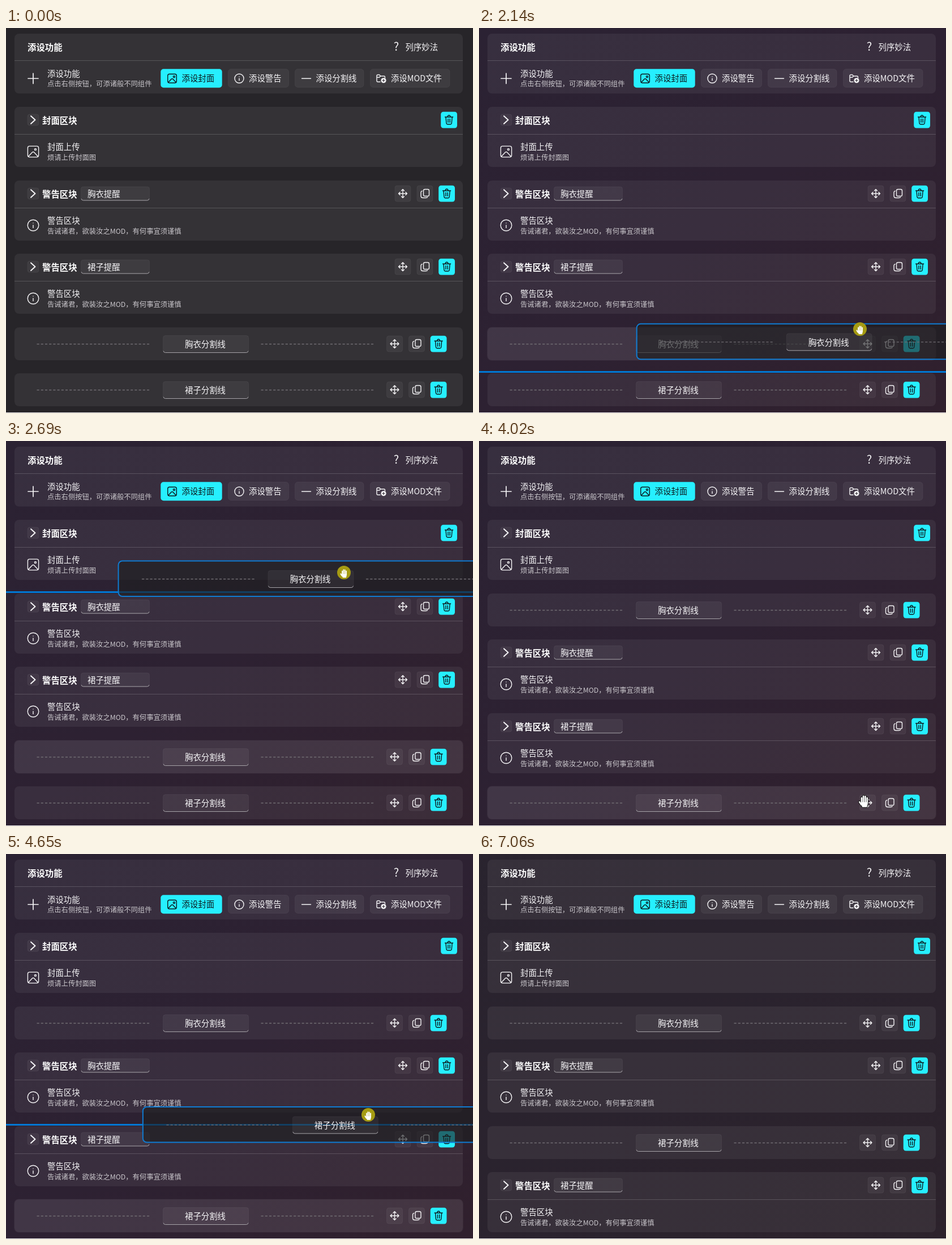
An HTML page for the animation above (7.09 s loop, 825x679 px).

```html
<!DOCTYPE html>
<html lang="zh-CN">
<head>
<meta charset="utf-8">
<style>
html, body { margin: 0; width: 100%; height: 100%; overflow: hidden; background: #272529; }
svg { display: block; width: 825px; height: 679px; }
text { font-family: "Noto Sans CJK SC", "Noto Sans CJK", sans-serif; font-weight: 350; fill: #f6f5f7; }
.b { font-weight: 700; fill: #fff; }
.d { fill: #c9c6cb; }
.k { fill: #0b1a1d; }
.i { fill: none; stroke: #f4f3f5; stroke-width: 1.4; stroke-linecap: round; stroke-linejoin: round; }
.i.dark { stroke: #0b1a1d; }
.card { fill: #fff; fill-opacity: .06; }
.hover { fill: #fff; fill-opacity: .04; }
.box { fill: #fff; fill-opacity: .05; stroke: #fff; stroke-opacity: .05; }
.cyan { fill: #26efff; }
.dash { stroke: #706c72; stroke-width: 1.3; stroke-dasharray: 4.2 3; }
</style>
</head>
<body>
<svg id="stage" viewBox="0 0 825 679" xmlns="http://www.w3.org/2000/svg"></svg>
<script>
const LOOP = 7090;
const stage = document.getElementById('stage');

// ---- drawing helpers ----
const text = (x, cy, s, size = 14.4, cls = '', anchor = 'start') =>
  `<text x="${x}" y="${cy + size * .37}" font-size="${size}" class="${cls}" text-anchor="${anchor}">${s}</text>`;
const rect = (x, y, w, h, r, cls) =>
  `<rect x="${x}" y="${y}" width="${w}" height="${h}" rx="${r}" class="${cls}"/>`;
const icon = (x, y, d, cls = '', extra = '') =>
  `<path transform="translate(${x} ${y})" class="i ${cls}" d="${d}" ${extra}/>`;
const ring = (r) => `M${-r} 0a${r} ${r} 0 1 0 ${2 * r} 0a${r} ${r} 0 1 0 ${-2 * r} 0`;

const ICON = {
  plus: 'M-9 0H9M0 -9V9',
  minus: 'M-8 0H8',
  chevron: 'M-3.5 -6.8L4 0L-3.5 6.8',
  move: 'M-7.5 0H7.5M0 -7.5V7.5M-5 -2.5L-7.5 0L-5 2.5M5 -2.5L7.5 0L5 2.5M-2.5 -5L0 -7.5L2.5 -5M-2.5 5L0 7.5L2.5 5',
  copy: 'M0 -7.5H5Q7.5 -7.5 7.5 -5V2Q7.5 4.5 5 4.5H0Q-2.5 4.5 -2.5 2V-5Q-2.5 -7.5 0 -7.5ZM-4.8 -4.6Q-7 -4 -7 -1.5V4Q-7 7.5 -3.5 7.5H1.5Q4 7.5 4.6 6.4',
  trash: 'M-7 -5H7M-2.4 -5Q-2.4 -8 0 -8Q2.4 -8 2.4 -5M-5.6 -5L-4.6 6Q-4.4 7.8 -2.6 7.8H2.6Q4.4 7.8 4.6 6L5.6 -5M-1.6 -1.8V4.4M1.6 -1.8V4.4',
  folder: 'M-1.5 6H-5.5Q-7.5 6 -7.5 4V-4.5Q-7.5 -6.5 -5.5 -6.5H-3L-.8 -4.2H5Q7 -4.2 7 -2.2V-1M-7.5 -2H-3L-.8 -4.2'
};
const info = (x, y, r) => icon(x, y, `${ring(r)}M0 ${-r * .02}V${r * .45}M0 ${-r * .42}v.1`);
const picture = (x, y, s, cls) => icon(x, y,
  `M${-s + 3} ${-s}H${s - 3}Q${s} ${-s} ${s} ${-s + 3}V${s - 3}Q${s} ${s} ${s - 3} ${s}H${-s + 3}Q${-s} ${s} ${-s} ${s - 3}V${-s + 3}Q${-s} ${-s} ${-s + 3} ${-s}Z` +
  `M${-s + 1.4} ${s - 1.4}L-1.4 1Q0 -.2 1.4 1L${s - 1.4} ${s - 1.4}M${s * .25} ${-s * .4}a1.5 1.5 0 1 0 3 0a1.5 1.5 0 1 0 -3 0`, cls);

const tool = (x, y, name) => rect(x - 14, y - 14, 28, 28, 4, 'box') + icon(x, y, ICON[name]);
const trash = (x, y) => rect(x - 14.4, y - 14.2, 28.8, 28.8, 4.5, 'cyan') + icon(x, y, ICON.trash, 'dark');
const tools = (x, y) => tool(x, y, 'move') + tool(x + 39, y, 'copy') + trash(x + 77.6, y);
const field = (x, y, w, h) => rect(x, y, w, h, 4, 'box') +
  `<path d="M${x + .5} ${y + h - 3}q.6 3 3.5 3h${w - 8}q2.9 0 3.5 -3" fill="none" stroke="#a5a2a7"/>`;
const panel = (h) => rect(15, 0, 792, h, 8, 'card') +
  `<rect class="hover" x="14" y="-.5" width="794" height="${h + 1}" rx="8" visibility="hidden"/>`;
const divider = (y) => `<path d="M15 ${y}H807" stroke="#fff" stroke-opacity=".17"/>`;
const caption = (y, title, note) => text(73, y + 70.5, title) + text(73, y + 88.5, note, 12.3, 'd');
const header = (title) => rect(38, 13, 20, 20, 4, 'box') +
  icon(47.5, 23, ICON.chevron, '', 'style="stroke-width:2"') + text(64, 24, title, 15.4, 'b');

// ---- cards, drawn with their top at y = 0 ----
const cover = () => panel(106) + header('封面区块') + trash(782.6, 23) + divider(48.5) +
  picture(48, 79, 9.6) + caption(.5, '封面上传', '烦请上传封面图');
const warning = (name) => panel(106) + header('警告区块') + field(132.5, 11, 121, 24) +
  text(144, 24, name) + tools(701, 23) + divider(48.5) + info(48, 79, 9.8) +
  caption(.5, '警告区块', '告诫诸君，欲装汝之MOD，有何事宜须谨慎');
const lineBody = (name) => `<path class="dash" d="M54.5 29.5H256M450.5 29.5H652"/>` +
  field(277.5, 14.5, 151, 30) + text(352, 30, name, 14.4, '', 'middle') + tools(686.5, 29);
const lineCard = (name) => panel(58) + lineBody(name);

const topCard = () => rect(15, 10, 792, 105.5, 8, 'card') + text(38, 34, '添设功能', 15.4, 'b') +
  text(689.5, 33, '?', 20, '', 'middle') + text(705.5, 33.5, '列序妙法') + divider(57.5) +
  icon(48, 89, ICON.plus, '', 'style="stroke-width:1.7"') +
  caption(10, '添设功能', '点击右侧按钮，可添诸般不同组件') +
  rect(273.3, 72.3, 108.4, 32.9, 5, 'cyan') + picture(293.5, 89, 7.8, 'dark') + text(310.5, 89, '添设封面', 14.4, 'k') +
  rect(392.5, 72.5, 107, 32, 5, 'box') + info(412, 89, 8) + text(429, 89, '添设警告') +
  rect(510.5, 72.5, 121.5, 32, 5, 'box') + icon(530.5, 89, ICON.minus) + text(547.5, 89, '添设分割线') +
  rect(643.5, 72.5, 140.5, 32, 5, 'box') + icon(662.5, 89, ICON.folder) +
  `<circle cx="667" cy="92.5" r="4.6" fill="#f4f3f5"/><path d="M664.6 92.5h4.8M667 90.1v4.8" stroke="#38333a" stroke-width="1.2"/>` +
  text(680, 89, '添设MOD文件');

const handFingers = 'M-4 1V-6.5M-.9 0V-9.5M2.4 0V-9.2M5.7 1V-6.5M-7.8 .5L-4.5 5.5M-4 2L-2 8.5H4.4L5.8 2Z';
const cards = {
  cover: { h: 106, pitch: 129.5, body: cover() },
  w1: { h: 106, pitch: 129.5, body: warning('胸衣提醒') },
  w2: { h: 106, pitch: 129.5, body: warning('裙子提醒') },
  s1: { h: 58, pitch: 81.6, body: lineCard('胸衣分割线') },
  s2: { h: 58, pitch: 81.6, body: lineCard('裙子分割线') }
};

stage.innerHTML = `
<defs>
  <linearGradient id="tint" x1="0" y1="0" x2="1" y2="1">
    <stop offset="0" stop-color="#2b2233"/><stop offset=".5" stop-color="#2d2132"/><stop offset="1" stop-color="#30202d"/>
  </linearGradient>
</defs>
<rect width="825" height="679" fill="#272529"/>
<rect id="mood" width="825" height="679" fill="url(#tint)"/>
${topCard()}
${Object.keys(cards).map(k => `<g id="${k}">${cards[k].body}</g>`).join('')}
<rect id="slot" width="825" height="3" fill="#0078d4"/>
<g id="drag">
  <rect x="1" y="1" width="796" height="62.5" rx="7" fill="#1d1f20" fill-opacity=".63" stroke="#0f7bd2" stroke-width="2"/>
  <g id="drag1" transform="translate(-12 3.5)">${lineBody('胸衣分割线')}</g>
  <g id="drag2" transform="translate(-12 3.5)">${lineBody('裙子分割线')}</g>
</g>
<rect y="678" width="825" height="1" fill="#efeef0"/>
<g id="cursor">
  <circle id="press" r="12" fill="#a59b12"/>
  <path id="arrow" d="M0 0V15.4L3.6 12.2L6 17.6L8.6 16.5L6.2 11.2H11Z" fill="#fff" stroke="#111" stroke-width=".9"/>
  <g id="hand" stroke-linecap="round" stroke-linejoin="round">
    <path id="rim" d="${handFingers}" fill="#111" stroke="#111" stroke-width="4.6"/>
    <path d="${handFingers}" fill="#fff" stroke="#fff" stroke-width="2.6"/>
  </g>
</g>`;

const el = {};
stage.querySelectorAll('[id]').forEach(n => el[n.id] = n);
const show = (n, on) => n.setAttribute('visibility', on ? 'inherit' : 'hidden');
const place = (n, x, y, s = 1) => n.setAttribute('transform', `translate(${x.toFixed(2)} ${y.toFixed(2)}) scale(${s})`);
const clamp = (v) => Math.min(1, Math.max(0, v));

// ---- timeline ----
const LAG = 24;
const drags = [
  { from: 1910, to: 3080, key: 's1' },
  { from: 4180, to: 5090, key: 's2' }
];
const orders = [
  ['cover', 'w1', 'w2', 's1', 's2'],
  ['cover', 's1', 'w1', 'w2', 's2'],
  ['cover', 's1', 'w1', 's2', 'w2']
];
// Cursor strokes: [time, x, y] points, at rest at both ends
const strokes = [
  [[1180, 323, 519], [1560, 680, 555]],
  [[1910, 680, 555], [2060, 682, 552], [2140, 673, 531], [2590, 598, 245], [2690, 597, 232]],
  [[3110, 597, 232], [3740, 766, 612]],
  [[3790, 766, 612], [4020, 680, 636]],
  [[4180, 680, 636], [4560, 641, 488], [4650, 640, 460], [4780, 640, 440]],
  [[5090, 640, 440], [5240, 636, 448]],
  [[5880, 636, 448], [6540, 606, 690]]
];

function layout(order) {
  const tops = {};
  let y = 139.2;
  for (const k of order) {
    tops[k] = Math.round(y);
    y += cards[k].pitch;
  }
  tops.end = Math.round(y);
  return tops;
}
const tops = orders.map(layout);

function along(pts, t) {
  const last = pts.length - 1;
  if (t <= pts[0][0]) return pts[0].slice(1);
  if (t >= pts[last][0]) return pts[last].slice(1);
  let i = 0;
  while (t > pts[i + 1][0]) i++;
  const a = pts[i], b = pts[i + 1], d = b[0] - a[0], u = (t - a[0]) / d;
  const slope = (j, c) => j === 0 || j === last ? 0 :
    (pts[j + 1][c] - pts[j - 1][c]) / (pts[j + 1][0] - pts[j - 1][0]);
  return [1, 2].map(c =>
    a[c] + (b[c] - a[c]) * u * u * (3 - 2 * u) +
    d * u * (1 - u) * (slope(i, c) * (1 - u) - slope(i + 1, c) * u));
}
function pointer(t) {
  let s = strokes[0];
  for (const q of strokes) if (t >= q[0][0]) s = q;
  return along(s, t);
}

function mood(t) {
  if (t >= 7000) return 1 - .15 * ((t - 7000) / 30 + 1);
  const u = clamp((t - 30) / 990);
  return 1 - (1 - u) ** 2;
}

function draw(t) {
  el.mood.setAttribute('opacity', clamp(mood(t)).toFixed(3));

  const drag = drags.find(d => t >= d.from && t < d.to);
  const stepNo = drags.filter(d => t >= d.to).length;
  const now = tops[stepNo], order = orders[stepNo];
  const [x, y] = pointer(t);
  const visible = t >= 1180 && t < 6540;
  const settled = (t >= 3080 && t < 3140) || (t >= 5090 && t < 5900);

  // Cards glide to their new places after a drop
  const since = stepNo ? clamp((t - drags[stepNo - 1].to) / 150) : 1;
  const rest = (1 - since) ** 3;
  for (const k of order) {
    const moved = stepNo && drags[stepNo - 1].key === k;
    const before = stepNo && !moved ? tops[stepNo - 1][k] : now[k];
    place(el[k], 0, now[k] + (before - now[k]) * rest);
    el[k].setAttribute('opacity', moved ? 1 - rest : 1);
    const over = visible && !settled && x > 14 && x < 808 && y >= now[k] && y <= now[k] + cards[k].h;
    show(el[k].querySelector('.hover'), drag ? drag.key === k : over);
  }

  show(el.drag, !!drag);
  show(el.slot, !!drag);
  if (drag) {
    // The lifted card trails the pointer and the slot follows the card
    const [lx, ly] = pointer(Math.max(drag.from, t - LAG));
    const dx = lx - 399, dy = ly - 21;
    place(el.drag, dx, dy);
    show(el.drag1, drag.key === 's1');
    show(el.drag2, drag.key === 's2');
    const next = order.find(k => now[k] + cards[k].h / 2 > dy + 40) || 'end';
    el.slot.setAttribute('y', now[next] - 4);
  }

  show(el.cursor, visible);
  place(el.cursor, x, y);
  const onMove = ['s1', 's2'].some(k => Math.abs(x - 686.5) < 15 && Math.abs(y - now[k] - 29) < 15);
  const hand = !!drag || (onMove && !settled);
  show(el.press, !!drag);
  show(el.hand, hand);
  show(el.arrow, !hand);
  show(el.rim, hand && !drag);
  place(el.hand, 0, drag ? 2 : 0, drag ? .72 : 1);
}

// visibility "inherit" lets a hidden group hide its parts
let start = null;
function tick(ms) {
  if (start === null) start = ms;
  draw((ms - start) % LOOP);
  requestAnimationFrame(tick);
}
draw(0);
requestAnimationFrame(tick);
</script>
</body>
</html>
```
